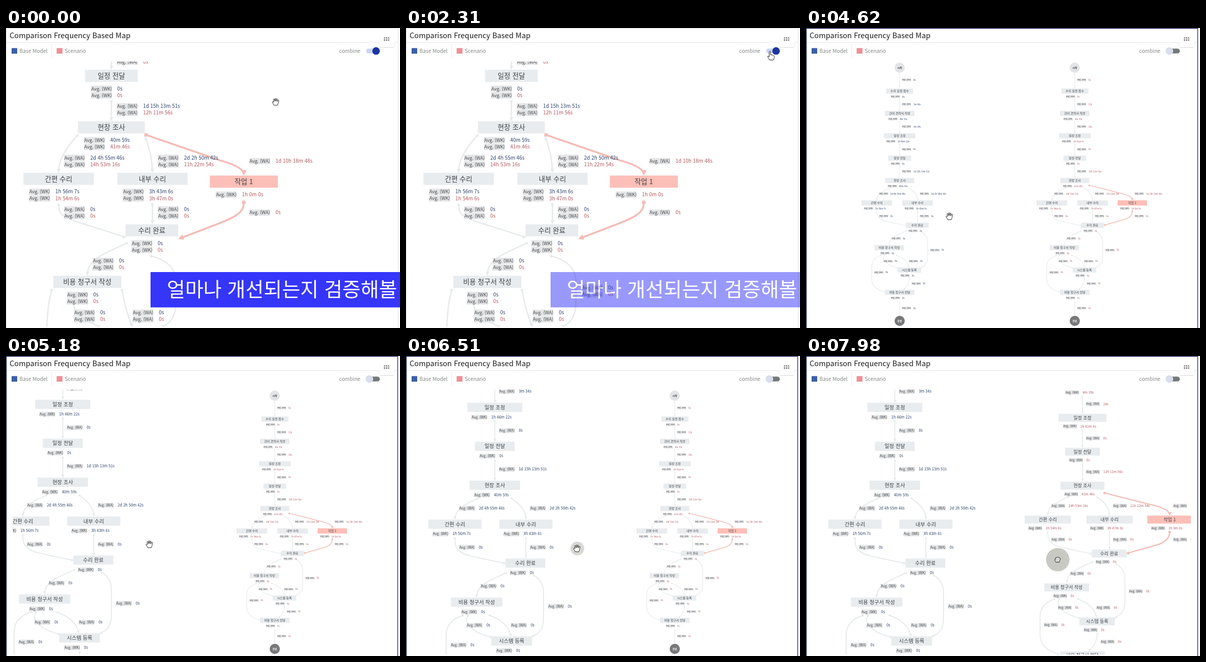
These frames come from a looping animation (774 by 590 pixels, 8000 ms). An HTML page:

```html
<!DOCTYPE html>
<html lang="ko">
<head>
<meta charset="utf-8">
<title>Comparison Frequency Based Map</title>
<style>
html, body { margin: 0; width: 100%; height: 100%; overflow: hidden; background: #fff; }
svg { display: block; width: 774px; height: 590px; font-family: "Noto Sans CJK KR", "Noto Sans KR", "Noto Sans CJK", "Noto Sans", sans-serif; }
.node { font-size: 5.9px; font-weight: 500; fill: #3c4046; text-anchor: middle; }
.tag { font-size: 3.95px; font-weight: 500; fill: #46494d; }
.val { font-size: 4.3px; font-weight: 400; }
.edge { fill: none; stroke: #e6eaea; stroke-width: 1.1; marker-start: url(#dot0); marker-end: url(#tip0); }
.hot { stroke: #f3bdb7; stroke-width: 1.6; marker-start: url(#dot1); marker-end: url(#tip1); }
.ui { font-size: 10.2px; font-weight: 500; fill: #85878a; }
.hand { fill: #fff; stroke: #222; stroke-width: 1; stroke-linejoin: round; }
</style>
</head>
<body>
<svg id="stage" viewBox="0 0 774 590">
  <defs>
    <clipPath id="full"><rect x="13" y="66" width="752" height="521"/></clipPath>
    <clipPath id="half1"><rect x="13" y="66" width="345" height="521"/></clipPath>
    <clipPath id="half2"><rect x="360" y="66" width="396" height="521"/></clipPath>
  </defs>
  <rect width="774" height="590" fill="#fff"/>
  <g id="maps"></g>
  <g id="head">
    <path d="M1 28.5H733M763 28.5H769" stroke="#e6e6e6"/>
    <path d="M733 28V34q0 4 4 4H759q4 0 4-4V28" fill="#fff" stroke="#ececec"/>
    <path d="M736 38.5H761" stroke="#dcdcdc"/>
    <text x="7" y="20.2" font-size="14.6" font-weight="500" fill="#1c1c1e">Comparison Frequency Based Map</text>
    <path d="M742.5 19.5h10.2M742.5 23.7h10.2" stroke="#444" stroke-width="2.2" stroke-dasharray="2.2 1.8"/>
    <rect x="11" y="39.5" width="11" height="11" fill="#3b60a8"/>
    <text class="ui" x="26.5" y="49">Base Model</text>
    <path d="M89.5 32V58" stroke="#ececec"/>
    <rect x="99.5" y="39.5" width="11.5" height="11" fill="#ee9094"/>
    <text class="ui" x="115.5" y="49">Scenario</text>
    <text class="ui" x="654.5" y="49">combine</text>
    <rect id="track" x="707.5" y="40.5" width="27" height="9.5" rx="4.7"/>
    <circle id="knob" cy="45.2" r="7.4"/>
  </g>
  <path id="frame" fill="none"/>
  <g id="banner">
    <rect x="284" y="480" width="490" height="69.5" fill="#3535fc"/>
    <text x="316" y="528" font-size="39" font-weight="500" fill="#fff">얼마나 개선되는지 검증해볼</text>
  </g>
  <circle id="press" fill="#a9a99f" opacity=".62"/>
  <g id="cursor">
    <path id="open" class="hand" d="M-3.5 7C-4.5 4.5-7 2-6.8.6-6.5-.6-5 0-4 1.2L-4.8-3.5C-5-5.6-3.1-5.8-2.6-4L-1.8-.8-1.9-5.2C-1.9-7.2 0-7.2.1-5.2L.4-1 1.1-4.9C1.5-6.7 3.2-6.3 3-4.5L2.6-.6 3.8-2.8C4.6-4.4 6.4-3.6 5.8-2 5 1 5.3 4 3.2 7Z"/>
    <path id="point" class="hand" d="M-3 9C-4 6-7 3-6.5 1.5-5.5.5-4.5 2-3.5 3V-7C-3.5-9-1-9-1-7V-1C0-2 2-2 2-.3 3-1.2 4.5-.8 4.5.7 6 0 6.8 1 6.6 2.5 6.4 5 6 6 5 9Z"/>
    <path id="fist" class="hand" fill-opacity=".25" d="M-3 5.5C-3.5 3.5-6 2.5-5.4.2-5 -1-4-.6-3.6-.2-4.4-4.5-2-4.6-1.4-3.4-.6-5.4 1.2-4.8 1.5-3.6 2.6-4.8 4-4 4-2.7 5.6-3 5.8-1.6 5.4 0 5 2.4 4.2 3 3.6 5.5Z"/>
  </g>
</svg>
<script>
const $ = id => document.getElementById(id);
const BASE = '#2b4168', SCEN = '#b2565e';

$('stage').querySelector('defs').innerHTML += ['#e6eaea', '#f3bdb7'].map((c, i) => `
  <marker id="dot${i}" viewBox="-2 -2 4 4" markerWidth="2.4" markerHeight="2.4"><circle r="1.7" fill="${c}"/></marker>
  <marker id="tip${i}" viewBox="-3 -2 4 4" markerWidth="3" markerHeight="3" orient="auto"><path d="M-3-2L1 0-3 2Z" fill="${c}"/></marker>`).join('');

// name, x, y, width, base time, scenario time
const nodes = [
  ['수리 요청 접수', 184, 124, 53, '0s', '0s'],
  ['간이 견적서 작성', 184, 168, 58, '4m 31s', '4m 39s'],
  ['일정 조정', 184, 212, 62, '1h 46m 22s', '1h 41m 6s'],
  ['일정 전달', 184, 256, 45, '0s', '0s'],
  ['현장 조사', 184, 300, 57, '40m 59s', '41m 46s'],
  ['간편 수리', 139, 344, 60, '1h 56m 7s', '1h 54m 6s'],
  ['내부 수리', 219, 344, 60, '3h 43m 6s', '3h 47m 0s'],
  ['작업 1', 297, 344, 58, '', '1h 0m 0s'],
  ['수리 완료', 218.5, 388, 45, '0s', '0s'],
  ['비용 청구서 작성', 163.5, 432, 58, '0s', '0s'],
  ['시스템 등록', 203, 476, 46, '0s', '0s'],
  ['비용 청구서 전달', 184, 520, 58, '0s', '0s']
];
// x, y, base wait, scenario wait
const waits = [
  [188.5, 102], [188.5, 150, '1m 46s', '53s'], [188.5, 194, '3m 34s', '28s'], [188.5, 238.3],
  [188.5, 282, '1d 15h 13m 51s', '12h 11m 56s'],
  [143.5, 326, '2d 4h 55m 46s', '14h 53m 16s'], [223.5, 326, '2d 2h 50m 42s', '11h 22m 54s'],
  [301.5, 326, '', '1d 10h 18m 48s'], [143.5, 370], [223.5, 370], [301.5, 370, '', '0s'],
  [168, 414], [244, 436.8], [152, 458.3], [202, 458.3], [134, 480.5], [207.5, 502.5], [188.5, 551]
];

const pen = document.createElement('canvas').getContext('2d');
pen.font = '43px "Noto Sans CJK KR", "Noto Sans KR", "Noto Sans", sans-serif';
const wide = s => pen.measureText(s).width / 10;

const row = (kind, x, y, val, color) =>
  `<rect x="${x}" y="${y - 2.6}" width="17.8" height="5.3" fill="#e4e5e6"/>
   <text class="tag" x="${x + .4}" y="${y + 1.45}">Avg. (${kind})</text>
   <text class="val" x="${x + 22.5}" y="${y + 1.5}" fill="${color}">${val}</text>`;

function edges(mode) {
  const both = mode === 'both', g = both ? 22 : 16;
  const down = (x, a, b) => `M${x} ${a + g}V${b - 6}`;
  const list = [
    'M184 90V118', 'M184 540V565',
    ...[124, 168, 212, 256].map(y => down(184, y, y + 44)),
    both ? 'M155 307Q139 324 139 338' : 'M165 315Q139 325 139 338',
    both ? 'M213.5 310Q219 325 219 338' : 'M203 315Q219 326 219 338',
    `M139 ${344 + g}C139 380 150 378 196 ${both ? 394 : 388.5}`,
    down(219, 344, 388),
    'M197 399C180 407 163.5 412 163.5 426',
    (both ? 'M218 410Q239 415 239 432' : 'M228 402Q239 408 239 422') + 'V450C239 462 234 468 226 471',
    'M154 447C148 454 156 466 181 472',
    both ? 'M193 439Q197 460 202 470' : 'M178 447Q199 455 202 470',
    (both ? 'M133 439Q129 455 129 472' : 'M148 447Q129 453 129 470') + 'V494Q129 512 154 519',
    'M203 492Q203 506 192 514'
  ];
  const hot = both
    ? ['M213.6 306.5L276 328Q297 334 297 340', 'M297 364C297 376 286 378 242 395']
    : ['M212.5 309.5L278 326Q297 331 297 338', 'M297 360Q297 372 280 377L241 388'];
  return list.map(d => `<path class="edge" d="${d}"/>`).join('') +
    (mode === 'base' ? '' : hot.map(d => `<path class="edge hot" d="${d}"/>`).join(''));
}

function rows(mode, kind, x, y, b, s, centre) {
  const vals = [];
  if (mode !== 'scen' && b) vals.push([b, BASE]);
  if (mode !== 'base' && s) vals.push([s, SCEN]);
  const left = centre ? x - 4 - (22.5 + Math.max(...vals.map(v => wide(v[0])))) / 2 : x;
  const shift = mode === 'both' && !b && !centre ? 2.8 : 0;
  return vals.map(([v, c], i) => row(kind, left, y + shift + i * 5.7, v, c)).join('');
}

function build(mode, clip) {
  const ends = [['시작', 78, '#e3e4e5', '#444'], ['종료', 576, '#77787a', '#fff']].map(([s, y, fill, ink]) =>
    `<circle cx="184" cy="${y}" r="10" fill="${fill}"/>
     <text x="184" y="${y + 1.9}" font-size="5" font-weight="700" text-anchor="middle" fill="${ink}">${s}</text>`);
  const boxes = nodes.map(([name, x, y0, w, b, s]) => {
    if (!b && mode === 'base') return '';
    const y = b || mode !== 'both' ? y0 : y0 + 2.4;
    return `<rect x="${x - w / 2}" y="${y - 5.2}" width="${w}" height="10.4" fill="${b ? '#e9ecee' : '#fcbfb8'}"/>
      <text class="node" x="${x}" y="${y + 2.2}">${name}</text>` + rows(mode, 'WK', x, y + 11, b, s, true);
  });
  const tags = waits.map(([x, y, b = '0s', s = '0s']) => rows(mode, 'WA', x, y, b, s));
  $('maps').innerHTML += `<g id="${mode}" clip-path="url(#${clip})"><g>${edges(mode)}${ends.join('')}${boxes.join('')}${tags.join('')}</g></g>`;
}
build('both', 'full');
build('base', 'half1');
build('scen', 'half2');

// tables of [time, values...], joined by straight lines
function at(keys, t) {
  let i = keys.findIndex(k => k[0] > t);
  if (i < 0) return keys[keys.length - 1].slice(1);
  if (!i) return keys[0].slice(1);
  const a = keys[i - 1], b = keys[i], p = (t - a[0]) / (b[0] - a[0]);
  return a.slice(1).map((v, n) => v + (b[n + 1] - v) * p);
}
const path = [
  [0, 530, 145], [70, 530, 145], [280, 625, 268], [420, 632, 275], [630, 670, 300], [840, 670, 300], [980, 640, 292],
  [1190, 600, 289], [1400, 597, 289], [1960, 718, 72], [2170, 717, 54], [3640, 717, 54], [3920, 282, 370],
  [5320, 282, 370], [5600, 273, 372], [5670, 273, 372], [6020, 336, 378], [6580, 336, 378], [6790, 519, 394],
  [7630, 519, 394], [7770, 484, 396.5], [7980, 494, 400]
];
const zoomL = [[4760, 0], [5180, 1]], zoomR = [[6860, 0], [7560, 1]];
const dragL = [[5670, 0, 0], [6020, 63, 6]], dragR = [[7770, 0, 0], [7980, 10.5, 3.5]];
const ring = [[5460, 0], [5600, 23], [6300, 23], [6510, 13.5], [6580, 0], [7770, 0], [7840, 23]];
const knob = [[2800, 727], [2870, 724], [3010, 714]];

const place = (id, s, x, y) => $(id).firstElementChild.setAttribute('transform', `translate(${x} ${y}) scale(${s})`);
const show = (id, on) => $(id).style.display = on ? '' : 'none';
const set = (id, attrs) => { for (const k in attrs) $(id).setAttribute(k, attrs[k]); };

place('both', 2.303, 207 - 184 * 2.303, 195.3 - 300 * 2.303);

function draw(now) {
  const t = Math.floor(now % 8000 / 70) * 70;
  const split = t >= 2520;
  show('both', !split);
  show('base', split);
  show('scen', split);

  const sl = 1.74 ** at(zoomL, t)[0], sr = 1.516 ** at(zoomR, t)[0];
  const [lx, ly] = at(dragL, t), [rx, ry] = at(dragR, t);
  place('base', sl, 282 * (1 - sl) + lx, 370 * (1 - sl) + ly);
  place('scen', sr, 519 * (1 - sr) + 344 * sr + rx, 394 * (1 - sr) + ry);

  $('banner').style.opacity = t < 2310 ? 1 : t < 2380 ? .5 : 0;
  set('frame', split
    ? { d: 'M.7 590V.7H769.5V590', stroke: '#2b3566', 'stroke-width': 1.4 }
    : { d: 'M.5 590V.5H770.5V590', stroke: '#dedfe1', 'stroke-width': 1 });

  const kx = at(knob, t)[0], on = kx > 719;
  set('knob', { cx: kx, fill: on ? '#1f35a0' : '#d8deea' });
  set('track', { fill: on ? '#cbd5f3' : '#77787b' });

  const [cx, cy] = at(path, t), r = at(ring, t)[0];
  set('press', { cx: cx + .5, cy: cy + .5, r, opacity: r < 20 ? .45 : .62 });
  set('cursor', { transform: `translate(${cx} ${cy})` });
  const click = t >= 2030 && t < 3710, grip = r > 20;
  show('point', click);
  show('fist', grip);
  show('open', !click && !grip);
}
function loop() {
  draw(performance.now());
  requestAnimationFrame(loop);
}
loop();
</script>
</body>
</html>
```
